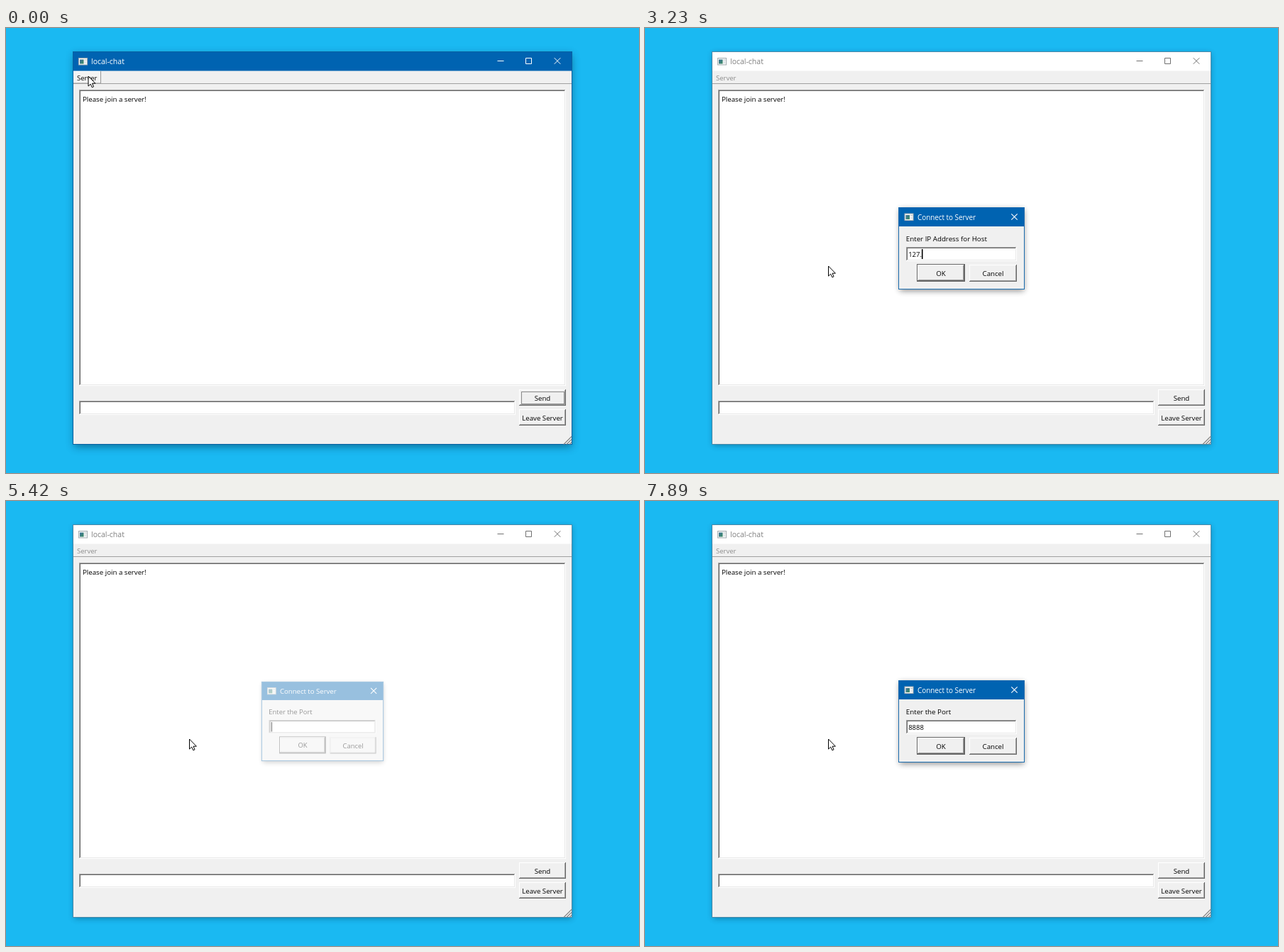
These frames come from a looping animation (892x628 px, 8000 ms). An HTML page:

```html
<!DOCTYPE html>
<html lang="en">
<head>
<meta charset="utf-8">
<title>Chat window</title>
<style>
  html, body { margin: 0; width: 100%; height: 100%; overflow: hidden; background: #1ab9f2; }
  svg { display: block; width: 892px; height: 628px; }
  text { font-family: "Open Sans", "Noto Sans", sans-serif; white-space: pre; }
</style>
</head>
<body>
<svg id="stage" viewBox="0 0 892 628"></svg>
<script>
const LOOP = 8000;
const FACE = '#f0f0f0', BLUE = '#0063b1';
const SUNKEN = ['#a0a0a0', '#696969', '#e8e8e8', '#fff'];
const RAISED = ['#fff', FACE, '#a0a0a0', '#696969'];

const rect = (x, y, w, h, fill, extra = '') =>
  `<rect x="${x}" y="${y}" width="${w}" height="${h}" fill="${fill}" ${extra}/>`;
const label = (x, y, text, size = 9.7, extra = '') =>
  `<text x="${x}" y="${y}" font-size="${size}" ${extra}>${text}</text>`;

// Two-pixel edge: outer and inner top-left, then inner and outer bottom-right.
const bevel = (x, y, w, h, [outerTL, innerTL, innerBR, outerBR], fill) =>
  rect(x, y, w, h, outerBR) + rect(x, y, w - 1, h - 1, outerTL) +
  rect(x + 1, y + 1, w - 2, h - 2, innerBR) + rect(x + 1, y + 1, w - 3, h - 3, innerTL) +
  rect(x + 2, y + 2, w - 4, h - 4, fill);

const button = (x, y, w, h, text) =>
  bevel(x, y, w, h, RAISED, FACE) +
  label(x + w / 2, y + h / 2 + 4, text, 9.7, 'text-anchor="middle"');

const appIcon = (x, y) =>
  rect(x + .5, y + .5, 12, 9.5, '#f4f6f6', 'stroke="#a3adb2"') +
  rect(x + 2, y + 2.5, 5.5, 6, 'url(#screen)') +
  rect(x + 8.5, y + 2.5, 3, 1, '#b9c4c8') + rect(x + 8.5, y + 5, 2.5, 3, '#dfe5e7');

const cross = (x, y, r) =>
  `<path d="M${x - r} ${y - r}l${2 * r} ${2 * r}m0 ${-2 * r}l${-2 * r} ${2 * r}" fill="none"/>`;

const defs = `<defs>
  <linearGradient id="screen" x2="1" y2="1">
    <stop stop-color="#3a6f9c"/><stop offset="1" stop-color="#3d8f62"/>
  </linearGradient>
  <filter id="wide" x="-10%" y="-10%" width="120%" height="120%"><feGaussianBlur stdDeviation="6"/></filter>
  <filter id="soft" x="-20%" y="-20%" width="140%" height="140%"><feGaussianBlur stdDeviation="4"/></filter>
</defs>`;

const mainWindow =
  rect(96, 38, 701, 553, '#002840', 'id="activeShadow" opacity=".5" filter="url(#wide)"') +
  rect(96, 36, 701, 553, '#002840', 'id="idleShadow" opacity=".42" filter="url(#soft)"') +
  rect(94.5, 33.5, 703, 554, FACE, 'id="frame"') +
  rect(95, 34, 702, 26.5, BLUE, 'id="titleBar"') +
  appIcon(102, 42) +
  label(120, 51, 'local-chat', 10.5, 'id="title"') +
  `<g id="controls"><path d="M692.5 46.5h9M732.5 42.5h8v8h-8z" fill="none"/>${cross(777, 46.5, 4.3)}</g>` +
  rect(95, 78, 702, 1, '#a0a0a0') +
  '<g id="menuHover">' + rect(95, 61, 38, 17, '#f4f4f4') + rect(95, 61, 38, 1, '#fff') +
  rect(133, 61, 1, 17, '#969696') + rect(95, 77, 38, 1, '#c4c4c4') + '</g>' +
  '<g id="menuPressed">' + bevel(95, 61, 39, 17, ['#a0a0a0', FACE, FACE, '#fff'], FACE) + '</g>' +
  label(100, 74, 'Server', 9.5, 'id="menuLabel"') +
  bevel(103, 87, 686, 418, SUNKEN, '#fff') +
  label(108, 103.5, 'Please join a server!') +
  bevel(103, 526, 615, 20, SUNKEN, '#fff') +
  button(723, 510, 66, 23, 'Send') +
  rect(726.5, 513.5, 60, 17, 'none', 'id="focus" stroke="#222" stroke-dasharray="1 1"') +
  button(723, 538, 66, 23, 'Leave Server') +
  '<path d="M786 587.5l11-11M790 587.5l7-7M794 587.5l3-3" stroke="#8a8a8a" stroke-width="1.2"/>';

const popup = '<g id="popup">' +
  rect(98, 82, 106, 22, '#000', 'opacity=".25"') +
  bevel(95, 78, 107, 24, RAISED, FACE) +
  label(114, 93.5, 'Join a Server') + '</g>';

const dialog = '<g id="dialog">' +
  rect(359, 256, 175, 115, '#000', 'opacity=".45" filter="url(#soft)"') +
  rect(357.5, 253.5, 177, 115, FACE, 'id="dialogFrame" stroke="#2a74ae"') +
  rect(358, 253.5, 176, 26.5, BLUE) +
  appIcon(365.5, 261.5) +
  label(384, 270.5, 'Connect to Server', 9.9, 'fill="#fff"') +
  `<g id="dialogClose" stroke="#fff" stroke-width="1.1">${cross(520.5, 266.5, 4.2)}</g>` +
  label(367.8, 301, '', 9.75, 'id="prompt"') +
  bevel(368, 309, 156, 20, SUNKEN, '#fff') +
  label(371.2, 323, '', 9.45, 'id="entry"') +
  rect(371, 312, 1.6, 14, '#000', 'id="caret"') +
  rect(383, 333, 68, 25, '#646464') +
  button(384, 334, 66, 23, 'OK') +
  button(457, 334, 67, 24, 'Cancel') + '</g>';

const pointer = `<path id="pointer" d="M.5 .5V14.6L3.7 11.6 5.8 16.3 8 15.3 6 10.7H10.4Z"
  fill="#fff" stroke="#000" stroke-width="1"/>`;

document.getElementById('stage').innerHTML =
  defs + rect(0, 0, 892, 628, '#1ab9f2') + mainWindow + popup + dialog + pointer;

const el = {};
document.querySelectorAll('#stage [id]').forEach(node => el[node.id] = node);
const set = (name, attrs) => {
  for (const key in attrs) el[name].setAttribute(key, attrs[key]);
};
const show = (name, on) => set(name, { visibility: on ? 'visible' : 'hidden' });

const HOST = '127.0.0.1', PORT = '8888';
// Each entry: time and number of characters typed by then.
const HOST_KEYS = [[0, 0], [2260, 2], [2580, 3], [3230, 4], [3460, 5], [3760, 6], [4070, 7], [4190, 8], [4520, 9]];
const PORT_KEYS = [[0, 0], [6120, 1], [6220, 2], [6560, 3], [6740, 4]];
// Each entry: time, opacity and scale of the dialog.
const FADES = [[0, 0, 1], [1600, 1, 1], [5200, .95, 1], [5300, .12, .95], [5420, .4, .968], [5550, .93, .997], [5680, 1, 1]];

const at = (steps, t) => steps.filter(step => step[0] <= t).pop();

function render(t) {
  const menuOpen = t >= 570 && t < 1600;
  const started = t >= 1600;
  const active = !started || (t >= 5200 && t < 5420);
  const askPort = t >= 5420;

  show('activeShadow', active);
  show('idleShadow', !active);
  set('frame', { stroke: active ? '#0a62a2' : '#4c89a8' });
  set('titleBar', { fill: active ? BLUE : '#fff' });
  set('title', { fill: active ? '#fff' : '#808080' });
  set('controls', { stroke: active ? '#fff' : '#707070' });
  set('menuLabel', { fill: started ? '#8c8c8c' : '#000' });
  show('menuHover', t < 570);
  show('menuPressed', menuOpen);
  show('popup', menuOpen);
  set('popup', { opacity: t < 590 ? .5 : 1 });
  show('focus', !started);

  const [, opacity, scale] = at(FADES, t);
  set('dialog', {
    opacity,
    transform: `translate(446 310.5) scale(${scale}) translate(-446 -310.5)`
  });
  show('dialog', started);
  show('dialogClose', started && !(t >= 5200 && t < 5420));
  set('dialogFrame', { stroke: t >= 5200 && t < 5420 ? '#6f8ca2' : '#1a6cae' });

  const typed = askPort ? PORT.slice(0, at(PORT_KEYS, t)[1]) : HOST.slice(0, at(HOST_KEYS, t)[1]);
  el.prompt.textContent = askPort ? 'Enter the Port' : 'Enter IP Address for Host';
  el.entry.textContent = typed;
  const advance = [...typed].reduce((sum, c) => sum + (c === '.' ? 2.5 : 5.4), 0);
  set('caret', { x: 371.2 + advance });
  show('caret', started && t < 7890);

  set('pointer', { transform: started ? 'translate(258 335.5)' : 'translate(115.5 67.5)' });
}

const start = performance.now();
function tick() {
  render((performance.now() - start) % LOOP);
  requestAnimationFrame(tick);
}
tick();
</script>
</body>
</html>
```
